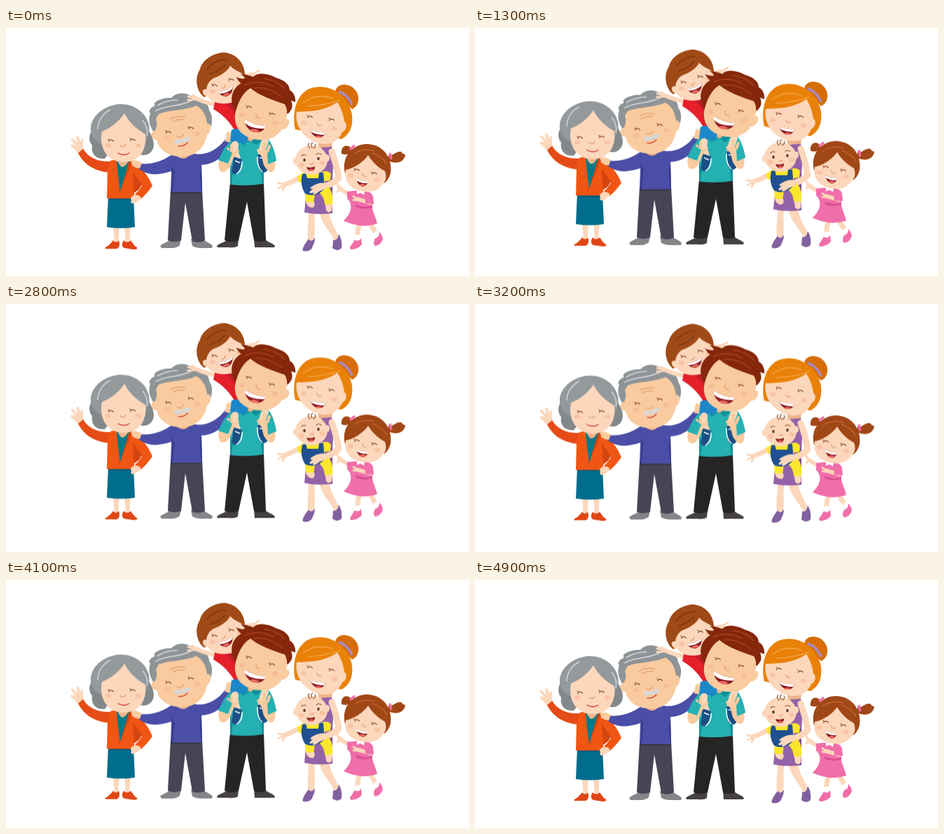
Write an HTML page that moves like this. It is 661 px wide and 355 px high and loops after 5 s.

```html
<!DOCTYPE html>
<html lang="en">
<head>
<meta charset="utf-8">
<title>Happy family</title>
<style>
html, body { margin: 0; width: 100%; height: 100%; overflow: hidden; background: #fff; }
svg { display: block; width: 100%; height: 100%; }
#family { animation: bob 5s infinite cubic-bezier(.37, 0, .63, 1); }
@keyframes bob { 50% { transform: translateY(-8px); } }
.skin { fill: #fcd7bb; }
.tan { fill: #f9cb9f; }
.shade { fill: #efb48a; }
.blush { fill: #f5b08d; opacity: .5; }
.line { fill: none; stroke: #8a4a28; stroke-width: 1.1; stroke-linecap: round; }
.nose { fill: none; stroke: #e6a57b; stroke-width: 1.5; stroke-linecap: round; }
.limb { fill: none; stroke: #fcd7bb; stroke-linecap: round; stroke-linejoin: round; }
.limb.dark { stroke: #f9cb9f; }
.lips { fill: none; stroke: #d2413a; stroke-width: 1.3; stroke-linecap: round; }
.mouth { fill: #8c1d22; }
.teeth { fill: #fff; }
.tongue { fill: #ed6a62; }
</style>
</head>
<body>
<svg viewBox="0 0 661 355">
<defs>
  <path id="eye" class="line" d="M-3.500 1.500Q-1-3 3.500 1M-3-1L-4-2"/>
  <ellipse id="cheek" class="blush" rx="4" ry="3"/>
</defs>
<g id="family">

  <!-- grandmother -->
  <g>
    <path fill="#83888b" d="M125 145C117 151 118 163 123 168C121 180 128 188 141 187L150 175L140 142ZM200 140C203 148 210 153 211 166C211 180 199 185 188 180L190 150Z"/>
    <path fill="#94999c" d="M162 109C181 108 199 119 204 138C206 148 203 156 199 163L196 168H142C130 166 120 156 121 143C122 124 143 110 162 109Z"/>
    <path fill="none" stroke="#d3d5d7" stroke-width="1.500" d="M131 145C131 134 137 123 149 117M195 132Q204 143 201 154"/>
    <path class="skin" d="M104 181C99 176 98 173 94 171C91 168 92 166 96 167L99 168L93 160C92 156 96 157 98 161L102 164L100 157C101 153 104 155 105 159L107 163C108 157 111 157 110 163C109 169 111 172 112 176Z"/>
    <path fill="#e54b16" d="M110 173C118 186 132 192 149 191L148 207C128 205 112 197 103 179Z"/>
    <path class="skin" d="M153 283H162L160 308H155ZM169 283H178L176 308H171Z"/>
    <path fill="#e04616" d="M142 314C146 312 150 308 153 304Q157 309 161 304C163 310 162 314 158 316H144Q140 316 142 314ZM187 314C183 312 181 308 178 304Q173 309 168 304C165 309 165 313 169 315L182 317Q189 317 187 314Z"/>
    <path fill="#006d8c" d="M146 240H182L184 285Q164 288 144 285Z"/>
    <path fill="#005b7a" d="M146 243H182V246H146Z"/>
    <path fill="#f15513" d="M149 190C158 187 176 187 183 192C193 198 204 213 209 226C203 234 198 240 192 245L184 238Q190 233 194 226L183 214V244H144L145 204Z"/>
    <path fill="#d4440f" d="M181 206L194 224L190 231L183 236ZM159 240L162 235L177 200L179 191L176 190Z"/>
    <path fill="#007a87" d="M158 190H176L163 234Q160 215 158 190Z"/>
    <path class="shade" d="M159 188H176Q171 199 166 199Q161 197 159 188Z"/>
    <path class="skin" d="M190 240C186 238 181 239 179 242C176 245 181 246 178 249C180 253 185 251 188 248L193 243Z"/>
    <path class="skin" d="M169 122C160 136 147 144 137 148C132 173 146 192 168 192C188 192 202 177 199 152C188 146 176 136 169 122Z"/>
    <use href="#cheek" x="146" y="168"/><use href="#cheek" x="189" y="168"/>
    <use href="#eye" x="150" y="161"/><use href="#eye" x="181" y="160"/>
    <path class="nose" d="M163 168Q167 172 171 167"/>
    <path class="lips" d="M160 179Q168 184 176 179"/>
  </g>

  <!-- grandfather -->
  <g>
    <path fill="#858489" d="M220 312C225 307 232 307 234 302H250L248 311Q245 314 238 315H222ZM295 312C291 307 285 307 282 302H264L266 312Q271 315 277 315H294Z"/>
    <path fill="#464555" d="M235 231H280L284 304Q275 309 266 305L256 250L250 304Q240 308 231 304Z"/>
    <path fill="#393744" d="M235 233H280V237H235Z"/>
    <path fill="#4a4ea6" d="M237 181C224 190 209 196 190 194L189 201C204 213 220 210 236 205L235 235H280L279 196C297 195 314 184 321 163L313 159C303 174 285 183 270 180Z"/>
    <path fill="#343985" d="M236 196L238 207L236 235H238L240 206ZM279 195L277 211L279 235H280Z"/>
    <path class="tan" d="M194 193C188 190 183 188 180 190C176 192 181 193 180 195C178 197 183 198 185 200L191 201Z"/>
    <path class="tan" d="M312 162C315 157 313 152 316 149Q318 147 319 151C322 144 325 145 323 150C327 148 328 151 325 157L320 164Z"/>
    <path class="shade" d="M241 178H264Q260 187 252 187Q244 186 241 178Z"/>
    <path fill="#8f9497" d="M213 152C206 143 202 132 206 122C202 119 207 113 213 111C207 106 224 99 236 100C243 92 257 92 263 97C278 97 290 108 290 118C297 127 294 142 289 148Z"/>
    <path class="tan" d="M218 123C234 117 257 118 272 111C283 118 286 128 287 137C294 135 294 149 287 153C283 174 268 185 250 184C231 184 218 174 215 160C206 160 205 147 213 147Q217 137 214 130Z"/>
    <path fill="none" stroke="#d5d7d9" stroke-width="1.500" d="M213 119C228 109 248 114 266 103M216 111Q229 103 245 103"/>
    <path class="nose" stroke-width="1" d="M235 130Q245 125 256 127M238 134Q247 130 254 131"/>
    <use href="#cheek" x="230" y="158"/><use href="#cheek" x="273" y="151"/>
    <use href="#eye" x="232" y="149"/><use href="#eye" x="264" y="143"/>
    <path class="nose" d="M244 155Q250 159 254 152"/>
    <path class="lips" d="M246 169Q254 170 259 164"/>
    <path fill="#d6d8db" d="M240 163C242 160 246 158 251 160C256 156 260 155 264 157C261 162 257 165 251 163C246 167 242 166 240 163Z"/>
  </g>

  <!-- boy behind -->
  <g>
    <path class="limb" stroke-width="7" d="M338 70L352 67"/>
    <path class="limb" stroke-width="3" d="M350 67L361 61M352 68L367 66"/>
    <path class="limb" stroke-width="6" d="M272 101Q285 107 301 110"/>
    <path class="limb" stroke-width="3" d="M271 101L260 98M271 102L260 103M272 101L266 96"/>
    <path fill="#e5202a" d="M298 106Q313 109 330 103L345 148H327C321 136 310 124 296 116Z"/>
    <path fill="#bd1c28" d="M314 109L326 106L331 131Q324 116 314 109Z"/>
    <path fill="#a04a17" d="M283 99C273 92 268 73 277 59C280 46 295 36 311 35C327 36 340 48 341 66Z"/>
    <path fill="none" stroke="#7f3510" stroke-width="1.500" d="M287 59Q298 45 315 45M290 66Q305 62 313 52"/>
    <path class="skin" d="M286 88C287 80 291 75 296 72C307 68 316 62 320 54C326 61 334 62 339 67C345 87 336 107 315 108C302 109 292 105 288 98C280 98 278 86 286 88Z"/>
    <use href="#cheek" x="295" y="91"/><use href="#cheek" x="333" y="77"/>
    <use href="#eye" x="298" y="82"/><use href="#eye" x="322" y="74"/>
    <path class="nose" d="M308 86Q312 87 313 82"/>
    <path class="mouth" d="M303 91Q315 91 323 83C325 91 320 97 314 98Q306 98 303 91Z"/>
    <path class="teeth" d="M303 91Q315 91 323 83L323 87Q315 94 305 94Z"/>
    <path class="tongue" d="M309 97Q314 91 320 94Q316 98 309 97Z"/>
  </g>

  <!-- father with the boy's legs -->
  <g>
    <path fill="#454143" d="M301 312C306 307 314 307 316 302H332L331 312Q327 315 318 314H302ZM384 312C380 307 373 307 370 302H354L355 314H383Z"/>
    <path fill="#252525" d="M320 221H368L371 304Q362 308 354 304L344 249L332 304Q321 308 312 304Z"/>
    <path fill="#25b0b2" d="M330 154Q349 149 370 155C380 162 384 178 386 189L367 196L368 223Q344 227 320 224L321 198L304 190C309 175 318 161 330 154Z"/>
    <path fill="#10909a" d="M320 195L324 207L322 224L320 224ZM368 194L364 208L366 223L368 223ZM334 153L348 164L363 153L365 160L357 168L348 161L338 168L331 158Z"/>
    <path class="shade" d="M337 152H361L349 163Z"/>
    <path fill="#1c87c9" d="M322 146Q334 140 347 154L343 164Q332 166 320 162Z"/>
    <path class="limb" stroke-width="10" d="M327 167Q325 176 330 187M370 162Q365 174 364 184"/>
    <path fill="#1c4f85" d="M325 184L337 188C335 195 335 203 330 208C326 212 321 207 323 201ZM359 181L371 179C369 188 376 197 373 204C369 209 363 207 361 201Z"/>
    <path fill="none" stroke="#fff" stroke-width="1.500" d="M337 191Q338 203 329 209M359 184Q358 199 366 206M327 190L334 193M362 186L369 185"/>
    <path class="limb dark" stroke-width="9" d="M308 193Q307 210 317 194L322 180M380 193Q381 210 372 194L368 178"/>
    <path class="limb dark" stroke-width="4" d="M319 184L317 173M322 182L322 168M324 184L331 176M366 182L360 175M368 179L369 165M372 180L376 169"/>
    <path fill="#25b0b2" d="M303 189L312 171L323 179L317 194ZM386 190L381 173L373 179L374 195Z"/>
    <path fill="#84270b" d="M329 120C317 106 322 86 336 79C332 77 331 73 328 70Q338 74 341 72Q339 68 335 66C344 66 350 69 353 70C359 63 375 65 385 71C399 75 405 82 405 89C411 92 414 100 413 106L407 104C411 113 407 119 402 123Z"/>
    <path fill="none" stroke="#ae4219" stroke-width="1.500" d="M340 82Q360 72 382 84M354 86Q374 83 394 99M368 72Q388 75 398 87"/>
    <path class="tan" d="M327 124C330 108 338 92 349 86C360 96 380 103 398 109C402 116 402 123 400 130C409 130 403 146 394 145C386 157 374 161 360 160C340 158 325 145 327 124Z"/>
    <use href="#cheek" x="337" y="124"/><use href="#cheek" x="384" y="136"/>
    <use href="#eye" x="347" y="113"/><use href="#eye" x="380" y="123"/>
    <path class="nose" d="M357 123Q356 130 363 129"/>
    <path class="mouth" d="M340 130Q354 140 371 140C368 149 360 151 351 148Q341 142 340 130Z"/>
    <path class="teeth" d="M340 130Q354 140 371 140L369 144Q351 145 341 136Z"/>
    <path class="tongue" d="M347 146Q355 142 362 148Q354 151 347 146Z"/>
  </g>

  <!-- mother -->
  <g>
    <path fill="#d66d0a" d="M470 92C471 79 488 78 497 87C507 97 504 112 494 116Z"/>
    <path fill="#e98109" d="M413 145C407 117 417 89 440 85C467 80 490 100 494 124C496 142 490 153 479 159Z"/>
    <path fill="none" stroke="#a88bc4" stroke-width="3.500" d="M475 91Q488 95 494 110"/>
    <path fill="none" stroke="#f4a03c" stroke-width="1.500" d="M424 107Q443 92 467 101M430 112Q456 111 477 103"/>
    <path class="skin" d="M432 262H442C438 277 444 293 438 306H432C428 291 433 279 432 262ZM447 262H461C463 279 472 288 476 302L469 304C463 290 450 281 447 262Z"/>
    <path fill="#80609f" d="M441 300C441 308 438 311 437 315Q432 321 424 319C422 316 428 307 432 302Q436 308 441 300ZM467 303Q473 306 475 295C479 301 480 308 479 315Q473 321 466 315Q467 309 467 303Z"/>
    <path class="shade" d="M445 163H466L464 180L450 187Z"/>
    <path fill="#9462a9" d="M443 184L451 171L465 170C471 192 463 216 466 265Q446 268 426 264L430 221Z"/>
    <path fill="#7a4b95" d="M460 222L466 211V265H462Z"/>
    <path class="limb" stroke-width="9" d="M465 177Q472 196 475 215Q466 224 449 229"/>
    <path class="skin" d="M415 120C437 120 459 117 473 106C478 114 482 124 483 134C488 136 486 147 480 149C475 161 465 167 453 166C430 164 411 143 415 120Z"/>
    <use href="#cheek" x="425" y="136"/><use href="#cheek" x="469" y="144"/>
    <use href="#eye" x="434" y="127"/><use href="#eye" x="465" y="131"/>
    <path class="nose" d="M444 136Q445 141 450 139"/>
    <path class="mouth" d="M434 145Q444 150 456 149Q454 157 446 157Q436 154 434 145Z"/>
    <path class="teeth" d="M434 145Q444 150 456 149L454 153Q444 153 436 149Z"/>
    <path class="tongue" d="M441 156Q446 152 451 156Q446 158 441 156Z"/>
  </g>

  <!-- baby -->
  <g>
    <path class="limb" stroke-width="7" d="M416 216Q408 221 398 224"/>
    <path class="limb" stroke-width="3" d="M398 224L389 222M398 225L389 229M398 226L395 232"/>
    <path fill="#fbe62e" d="M424 207L415 213L418 221L428 222ZM449 207Q459 202 464 209L463 218L451 220ZM424 207H455V225H424ZM428 234L441 237L439 252L429 251Q426 242 428 234ZM445 232L458 226C466 231 467 242 466 253L456 255L453 243Z"/>
    <path fill="#20508f" d="M423 209L428 208L430 215H446L447 207H453L455 230Q442 244 427 237Q419 225 423 209Z"/>
    <path class="skin" d="M428 249L440 249Q442 254 438 257Q431 258 428 249ZM456 253L466 252L465 262Q460 266 457 261Z"/>
    <path class="skin" d="M455 222C447 221 441 224 435 228Q433 231 438 230L433 235Q434 238 439 235L438 238Q442 239 447 234L459 229Z"/>
    <ellipse class="skin" cx="413" cy="191" rx="3" ry="5"/>
    <ellipse class="skin" cx="459" cy="186" rx="3" ry="5"/>
    <ellipse class="skin" cx="436" cy="189" rx="23" ry="21"/>
    <path class="line" d="M434 172Q429 167 433 165M437 171Q434 166 438 164M439 172Q444 168 441 166"/>
    <use href="#cheek" x="422" y="196"/><use href="#cheek" x="452" y="193"/>
    <g fill="#503329"><ellipse cx="426" cy="189" rx="1.700" ry="2.200"/><ellipse cx="446" cy="187" rx="1.700" ry="2.200"/></g>
    <path class="line" d="M422 183Q425 180 428 182M443 181Q446 178 450 181"/>
    <path class="nose" d="M434 194Q437 196 439 193"/>
    <path class="mouth" d="M429 199Q436 201 441 198Q441 205 436 205Q431 205 429 199Z"/>
    <path class="tongue" d="M432 203Q436 200 440 203Q436 207 432 203Z"/>
  </g>

  <!-- girl -->
  <g>
    <path class="limb" stroke-width="6" d="M476 229Q485 236 494 240"/>
    <path class="limb" stroke-width="3" d="M476 230L472 222M477 231L473 234"/>
    <path class="limb" stroke-width="7" d="M505 281Q501 290 502 302M520 279Q523 287 531 297"/>
    <path fill="none" stroke="#fff" stroke-width="7" d="M502 296V304M527 292L532 298"/>
    <path fill="#f06ea9" d="M498 303Q503 307 507 301L508 310Q502 317 493 317Q489 315 493 311ZM527 301Q533 300 533 292Q537 296 538 302Q535 311 527 312Q523 309 527 301Z"/>
    <path fill="#f06ea9" d="M498 233L516 234C524 236 526 243 523 250C521 260 528 270 530 280Q508 288 482 276C492 266 497 254 487 244L487 234Z"/>
    <path fill="#d74d90" d="M500 253Q513 259 523 254L523 257Q511 261 499 256Z"/>
    <path class="limb" stroke-width="6" d="M520 250Q512 248 502 245"/>
    <path class="limb" stroke-width="3" d="M502 245L496 241M502 246L496 246"/>
    <path fill="#f06ea9" d="M512 235Q525 236 525 252L513 251Z"/>
    <path fill="#fff" d="M501 233H512L511 239L506 236L501 238Z"/>
    <path fill="#a04716" d="M494 173C487 165 478 168 479 180Q486 183 494 178ZM546 182C554 183 556 176 564 177Q567 181 570 181C569 192 557 196 546 190Z"/>
    <path fill="#a04716" d="M484 208C478 184 495 166 516 166C538 167 552 185 549 208Q546 218 540 222Z"/>
    <path fill="none" stroke="#c4652a" stroke-width="1.500" d="M496 181Q509 171 526 176M523 179Q535 182 544 195"/>
    <path fill="none" stroke="#f06ea9" stroke-width="3.500" d="M491 174L498 168M548 179L550 188"/>
    <path class="skin" d="M485 203C497 201 510 192 517 182C524 194 534 201 541 205C544 213 542 219 539 222C532 233 521 236 509 234C491 231 482 219 485 203Z"/>
    <use href="#cheek" x="492" y="211"/><use href="#cheek" x="530" y="217"/>
    <use href="#eye" x="501" y="203"/><use href="#eye" x="526" y="208"/>
    <path class="nose" d="M509 208Q509 213 514 212"/>
    <path class="mouth" d="M500 215Q508 220 517 219Q515 227 509 227Q501 224 500 215Z"/>
    <path class="teeth" d="M500 215Q508 220 517 219L516 222Q507 223 500 218Z"/>
    <path class="tongue" d="M504 225Q509 221 514 225Q509 228 504 225Z"/>
  </g>
</g>
</svg>
</body>
</html>
```
